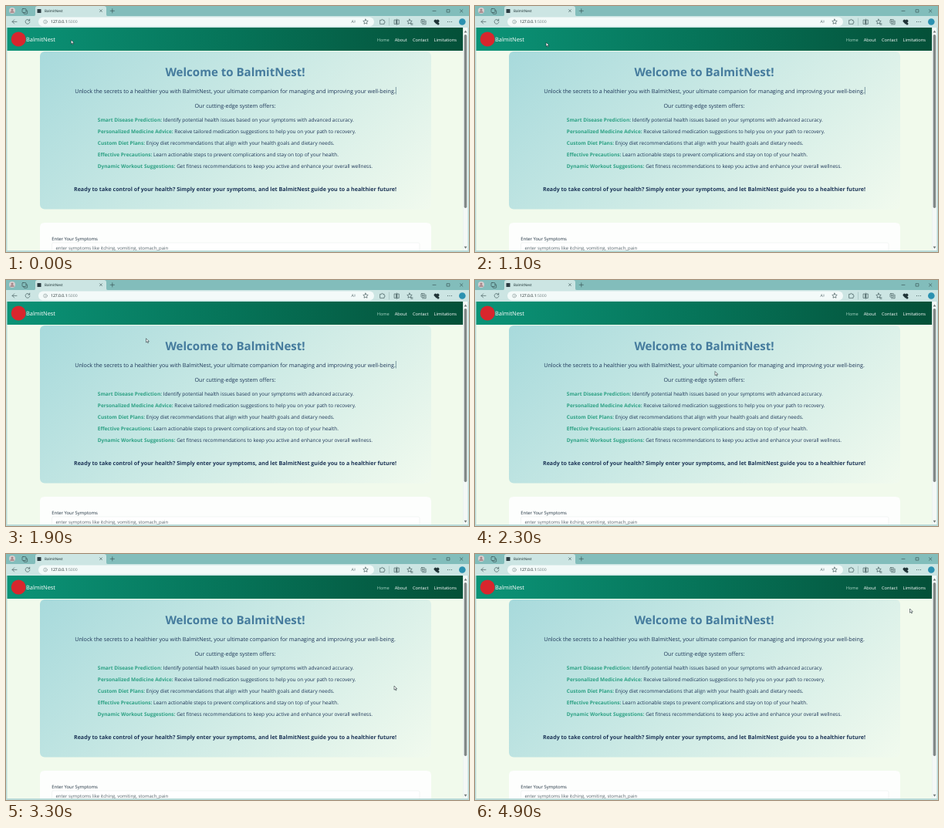
Animation of 600x319 px, one loop 5 s. Source, as an HTML page:

```html
<!DOCTYPE html>
<html lang="en">
<head>
<meta charset="utf-8">
<title>BalmitNest</title>
<style>
  html, body { margin: 0; width: 100%; height: 100%; overflow: hidden; background: #f1faee; }
  svg { display: block; width: 100vw; height: 100vh; }
  text { font-family: "Open Sans", "Noto Sans", sans-serif; text-rendering: geometricPrecision; }
  .icon { fill: none; stroke: #30484a; stroke-width: .6; stroke-linecap: round; stroke-linejoin: round; }
  .hero { fill: #1d3557; font-size: 7.17px; text-anchor: middle; }
  .hero .head { fill: #457b9d; font-size: 15.05px; font-weight: 700; }
  .hero .call { font-size: 7.1px; font-weight: 700; }
  .feature { fill: #1d3557; font-size: 6.53px; }
  .feature tspan { fill: #2da184; font-weight: 700; }
  .nav { fill: #fff; font-size: 5.7px; font-weight: 500; }
</style>
</head>
<body>
<svg viewBox="0 0 600 319" preserveAspectRatio="none">
  <defs>
    <linearGradient id="navFill">
      <stop offset="0" stop-color="#0b9377"/>
      <stop offset=".5" stop-color="#067358"/>
      <stop offset="1" stop-color="#045038"/>
    </linearGradient>
    <linearGradient id="heroFill" gradientUnits="userSpaceOnUse" x1="119.6" y1="-16.6" x2="475.4" y2="339.1">
      <stop offset="0" stop-color="#a8dadc"/>
      <stop offset="1" stop-color="#f1faee"/>
    </linearGradient>
  </defs>

  <!-- browser window -->
  <rect width="600" height="319" fill="#b9dad8"/>
  <rect width="600" height="13" fill="#82bdbb"/>
  <rect y="13" width="600" height="15" fill="#cce5e3"/>
  <path d="M36.500 13q1.500 0 1.500-2V3q0-3 3-3h86q3 0 3 3v8q0 2 1.500 2z" fill="#cce5e3"/>
  <circle cx="8" cy="6" r="4" fill="#d8cfcf"/>
  <circle cx="8" cy="5" r="1.5" fill="#a58487"/>
  <path d="M5.3 8.8a2.7 2.4 0 0 1 5.4 0z" fill="#a58487"/>
  <g class="icon">
    <rect x="21" y="3.5" width="5" height="5" rx="1"/>
    <path d="M23 8.5v1q0 .8.8.8h3q.8 0 .8-.8v-3q0-.8-.8-.8H26"/>
    <path d="M121.5 4.7l3 3m0-3l-3 3M135.2 6.3h5.2m-2.6-2.6v5.2"/>
    <path d="M553 6.4h4M571.5 4.7h3.4v3.4h-3.4zM588.4 4.7l3.5 3.5m0-3.5l-3.5 3.5"/>
    <path d="M14 20.4H8.2m2.5-2.6l-2.6 2.6 2.6 2.6M30.5 18.8a2.9 2.9 0 1 0 .4 2.1m-.2-3.8v2h-2"/>
  </g>
  <rect x="40.5" y="4" width="5" height="5" rx=".6" fill="#2c3c42"/>
  <text x="50" y="8.1" font-size="4.6" font-weight="500" fill="#14282b">BalmitNest</text>

  <rect x="42" y="14.5" width="435" height="12" rx="6" fill="#f3faf9"/>
  <g class="icon" style="stroke: #738485; stroke-width: .5">
    <circle cx="51" cy="20.5" r="2.4"/><path d="M51 20.3v1.3m0-2.5v.1"/>
  </g>
  <text x="58" y="22.3" font-size="5.1" font-weight="500" fill="#0c1a1c">127.0.0.1<tspan fill="#738485">:5000</tspan></text>
  <text x="447.5" y="22.3" font-size="5.2" fill="#506567">A<tspan font-size="3.5" dy="-1.2">))</tspan></text>
  <path class="icon star" transform="translate(466 20.5)"/>
  <g class="icon">
    <path d="M485 18.4h1.5a1 1 0 0 1 2 0h1.6v1.5a1 1 0 0 1 0 2v1.5H485z"/>
    <path d="M496.5 16v9" style="stroke: #9bb8b7"/>
    <path d="M503.5 18h2.1v5.4h-2.1zM507.2 18h2.1v5.4h-2.1zM506.4 17v7.4"/>
    <path class="star" transform="translate(523 20.5)"/>
    <path d="M525 22.8h2m-2 1.4h2"/>
    <rect x="538" y="17.6" width="4.7" height="4.7" rx=".8"/>
    <path d="M539.6 23.8h4.5v-4.5M540.3 18.8v2.4m-1.2-1.2h2.4"/>
    <path d="M572.5 20.5h.1m2.3 0h.1m2.3 0h.1" style="stroke-width: .9"/>
  </g>
  <path d="M558 23.8l-3.2-3.2a1.8 1.8 0 0 1 3.2-2.1 1.8 1.8 0 0 1 3.2 2.1z" fill="#203437"/>
  <circle cx="560" cy="23" r="1.5" fill="#203437"/>
  <circle cx="591.3" cy="20.5" r="4.3" fill="#2b91b0"/>

  <!-- page -->
  <rect x="1.5" y="28" width="591" height="289" fill="#f1faec"/>
  <rect x="1.5" y="28" width="590.8" height="30" fill="url(#navFill)"/>
  <circle cx="16.2" cy="43" r="9.5" fill="#d8262d"/>
  <text x="26" y="46.2" font-size="7.4" fill="#fff">BalmitNest</text>
  <g class="nav">
    <text x="480.7" y="45.8" fill="#a8d5c4">Home</text>
    <text x="503.7" y="45.8">About</text>
    <text x="527" y="45.8">Contact</text>
    <text x="554.6" y="45.8">Limitations</text>
  </g>

  <rect x="44" y="59" width="507" height="204.5" rx="6" fill="url(#heroFill)"/>
  <g class="hero">
    <text class="head" x="297" y="91">Welcome to BalmitNest!</text>
    <text x="297" y="113">Unlock the secrets to a healthier you with BalmitNest, your ultimate companion for managing and improving your well-being.</text>
    <text x="297" y="131.6">Our cutting-edge system offers:</text>
    <text class="call" x="297" y="239.6">Ready to take control of your health? Simply enter your symptoms, and let BalmitNest guide you to a healthier future!</text>
  </g>
  <g id="features"></g>
  <rect id="caret" x="504.9" y="105" width=".6" height="9.5" fill="#3c6478"/>

  <path d="M44 317v-30q0-6 6-6h495q6 0 6 6v30z" fill="#fdfefd"/>
  <text x="59.3" y="303.7" font-size="5.9" fill="#1f3140">Enter Your Symptoms</text>
  <path d="M59.5 317v-8q0-2 2-2h472.500q2 0 2 2v8" fill="#fff" stroke="#e9eeed" stroke-width=".6"/>
  <text x="64.5" y="315.8" font-size="5.97" fill="#57656c">enter symptoms like itching, vomiting, stomach_pain</text>

  <!-- scrollbar and lower frame -->
  <rect x="592.3" y="28" width="6.200" height="289" fill="#f4f8f6"/>
  <rect x="593.7" y="37" width="3.500" height="225" rx="1.7" fill="#818886"/>
  <path d="M593.6 34.500l1.900-2.900 1.900 2.900zM593.6 311.800l1.900 2.900 1.900-2.900z" fill="#737b79"/>
  <rect y="317" width="600" height="2" fill="#b9dad8"/>

  <path id="pointer" d="M0 0v5.200l1.300-1.100.9 1.900.8-.4-.9-1.800h1.700z" fill="#fff" stroke="#17262b" stroke-width=".55"/>
</svg>

<script>
const LOOP = 5000, STEP = 100, BLINK = 840;

const features = [
  ["Smart Disease Prediction:", "Identify potential health issues based on your symptoms with advanced accuracy."],
  ["Personalized Medicine Advice:", "Receive tailored medication suggestions to help you on your path to recovery."],
  ["Custom Diet Plans:", "Enjoy diet recommendations that align with your health goals and dietary needs."],
  ["Effective Precautions:", "Learn actionable steps to prevent complications and stay on top of your health."],
  ["Dynamic Workout Suggestions:", "Get fitness recommendations to keep you active and enhance your overall wellness."]
];

// time, x, y of the pointer tip
const route = [
  [0, 84.3, 44], [700, 90.3, 48], [1500, 94.8, 46.3], [2300, 311, 118.5],
  [3300, 503, 171], [4200, 555, 37.5], [4900, 563.5, 71], [5000, 563.5, 71]
];

const pointer = document.getElementById("pointer");
const caret = document.getElementById("caret");

document.getElementById("features").innerHTML = features.map(([name, note], i) =>
  `<text class="feature" x="118.8" y="${150.2 + i * 14.9}"><tspan>${name}</tspan> ${note}</text>`
).join("");

const starPath = "M" + Array.from({ length: 10 }, (_, i) => {
  const r = i % 2 ? 1.6 : 3.4, a = i * Math.PI / 5;
  return `${(r * Math.sin(a)).toFixed(2)} ${(-r * Math.cos(a)).toFixed(2)}`;
}).join("L") + "z";
document.querySelectorAll(".star").forEach(el => el.setAttribute("d", starPath));

const slope = (i, k) => (route[i + 1][k] - route[i][k]) / (route[i + 1][0] - route[i][0]);

// Tangent that never overshoots the waypoints
function tangent(i, k) {
  if (i === 0 || i === route.length - 1) return 0;
  const a = slope(i - 1, k), b = slope(i, k);
  return a * b > 0 ? 2 * a * b / (a + b) : 0;
}

function along(t, k) {
  let i = 0;
  while (i < route.length - 2 && t >= route[i + 1][0]) i++;
  const span = route[i + 1][0] - route[i][0];
  const u = (t - route[i][0]) / span, v = 1 - u;
  return route[i][k] * v * v * (1 + 2 * u) + route[i + 1][k] * u * u * (3 - 2 * u)
    + span * u * v * (tangent(i, k) * v - tangent(i + 1, k) * u);
}

function draw(time) {
  const t = Math.floor((time % LOOP) / STEP) * STEP;
  pointer.setAttribute("transform", `translate(${along(t, 1).toFixed(2)} ${along(t, 2).toFixed(2)})`);
  caret.setAttribute("visibility", t % BLINK < BLINK / 2 ? "visible" : "hidden");
}

const start = performance.now();
function tick() {
  draw(performance.now() - start);
  requestAnimationFrame(tick);
}
tick();
</script>
</body>
</html>
```
